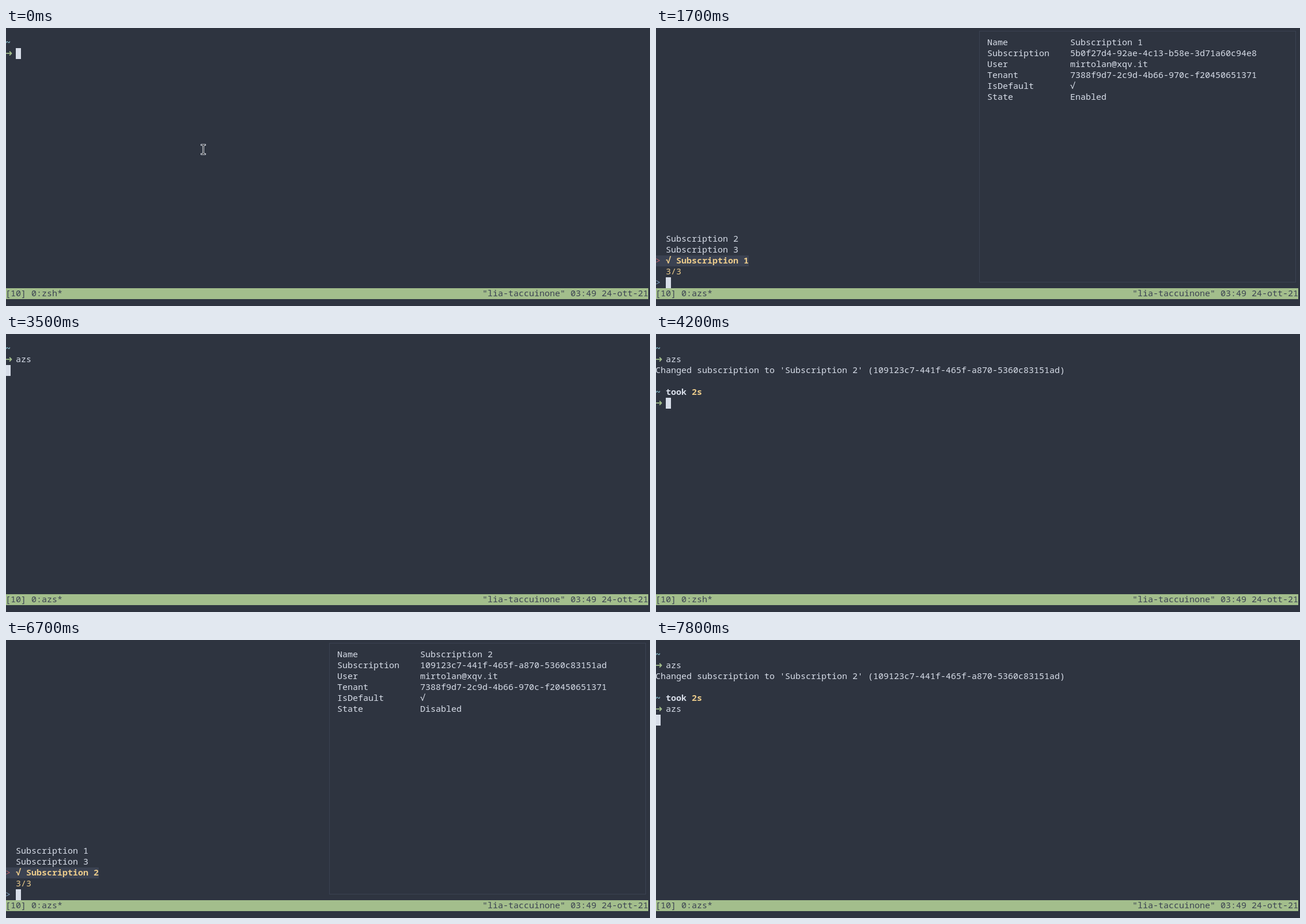
Recreate the animation shown at these times as an HTML page with a canvas. Size 1118 by 484 pixels, loop 8 s.

```html
<!DOCTYPE html>
<html lang="en">
<head>
<meta charset="utf-8">
<title>Terminal session</title>
<style>
  html, body { margin: 0; width: 100%; height: 100%; overflow: hidden; background: #2e3440; }
  canvas { display: block; }
</style>
</head>
<body>
<canvas id="stage" width="1118" height="484"></canvas>
<script>
const ctx = document.getElementById('stage').getContext('2d');
const LOOP = 8000, CELL_W = 9, CELL_H = 19;
const MONO = '15px "Noto Sans Mono", "DejaVu Sans Mono", monospace';
const C = {
  bg: '#2e3440', fg: '#d8dee9', dark: '#3b4252', green: '#a3be8c', cyan: '#88c0d0',
  yellow: '#ebcb8b', red: '#bf616a', blue: '#81a1c1'
};

const HOST = 'lia-taccuinone';
const USER = 'mirtolan@xqv.it';
const TENANT = '7388f9d7-2c9d-4b66-970c-f20450651371';
const SUBS = {
  1: { id: '5b0f27d4-92ae-4c13-b58e-3d71a60c94e8', state: 'Enabled' },
  2: { id: '109123c7-441f-465f-a870-5360c83151ad', state: 'Disabled' },
  3: { id: '75e403c1-b3ce-44b0-a616-fc483fec4f2f', state: 'Enabled' }
};

// The character grid starts slightly outside the stage.
const colX = col => col * CELL_W - 1;
const rowY = row => row * CELL_H - 3;

function rect(x, y, w, h, color) {
  ctx.fillStyle = color;
  ctx.fillRect(x, y, w, h);
}

function text(str, col, row, color = C.fg, bold = false) {
  ctx.font = (bold ? 'bold ' : '') + MONO;
  ctx.fillStyle = color;
  ctx.fillText(str, colX(col), rowY(row) + 14);
}

function cursor(col, row) {
  rect(colX(col), rowY(row), CELL_W, CELL_H, C.fg);
}

function cross(col, row) {
  const x = colX(col) + 2.5, y = rowY(row) + 6.5, size = 7;
  ctx.strokeStyle = C.fg;
  ctx.lineWidth = 2.8;
  ctx.beginPath();
  ctx.moveTo(x, y);
  ctx.lineTo(x + size, y + size);
  ctx.moveTo(x + size, y);
  ctx.lineTo(x, y + size);
  ctx.stroke();
}

function mouse() {
  rect(338, 202, 9, 3, C.fg);
  rect(338, 218, 9, 3, C.fg);
  rect(341, 203, 3, 17, C.fg);
  rect(339, 203, 7, 1, '#000');
  rect(339, 219, 7, 1, '#000');
  rect(342, 203, 1, 17, '#000');
}

function status(name) {
  rect(0, rowY(24), 1115, CELL_H, C.green);
  text(`[10] 0:${name}*`, 0, 24, C.dark);
  const right = `"${HOST}" 03:49 24-ott-21`;
  text(right, 124 - right.length, 24, C.dark);
}

function prompt(row, typed) {
  text('~', 0, row, C.cyan, true);
  ctx.font = 'bold 15px "DejaVu Sans", sans-serif';
  ctx.fillStyle = C.green;
  ctx.fillText('➜', colX(0), rowY(row + 1) + 14);
  text(typed, 2, row + 1);
}

function preview(n, isDefault) {
  ctx.strokeStyle = C.dark;
  ctx.lineWidth = 1;
  ctx.strokeRect(561.5, 5.5, 549, 437);
  const rows = [
    ['Name', `Subscription ${n}`],
    ['Subscription', SUBS[n].id],
    ['User', USER],
    ['Tenant', TENANT],
    ['IsDefault', isDefault ? '√' : ''],
    ['State', SUBS[n].state]
  ];
  rows.forEach(([label, value], i) => {
    text(label, 64, i + 1);
    text(value, 80, i + 1);
  });
  if (!isDefault) cross(80, 5);
}

// The last entry of the list is the default subscription.
function picker(list, selected) {
  list.forEach((n, i) => {
    const row = 19 + i, current = n === selected;
    const label = (i === list.length - 1 ? '√ ' : '') + `Subscription ${n}`;
    if (current) {
      rect(0, rowY(row), colX(label.length + 2), CELL_H, C.dark);
      text('>', 0, row, C.red);
    }
    text(label, 2, row, current ? C.yellow : C.fg, current);
  });
  text('3/3', 2, 22, C.yellow);
  text('>', 0, 23, C.blue);
  cursor(2, 23);
  preview(selected, selected === list[list.length - 1]);
}

function shell(typed, at) {
  prompt(1, typed);
  cursor(...(at || [2 + typed.length, 2]));
}

function result() {
  text(`Changed subscription to 'Subscription 2' (${SUBS[2].id})`, 0, 3);
}

function secondShell(typed, at) {
  prompt(1, 'azs');
  result();
  prompt(5, typed);
  text('took', 2, 5, C.fg, true);
  text('2s', 7, 5, C.yellow, true);
  cursor(...(at || [2 + typed.length, 6]));
}

const FIRST = [2, 3, 1], SECOND = [1, 3, 2];
const SCENES = [
  [0, () => { shell(''); mouse(); }],
  [600, () => shell('')],
  [700, () => shell('a')],
  [900, () => shell('az')],
  [1200, () => shell('azs')],
  [1600, () => shell('azs', [0, 3])],
  [1700, () => picker(FIRST, 1)],
  [2600, () => picker(FIRST, 3)],
  [2900, () => picker(FIRST, 2)],
  [3500, () => shell('azs', [0, 3])],
  [3900, () => { shell('azs', [0, 4]); result(); }],
  [4000, () => secondShell('')],
  [5700, () => secondShell('a')],
  [5900, () => secondShell('az')],
  [6100, () => secondShell('azs')],
  [6300, () => secondShell('azs', [0, 7])],
  [6400, () => picker(SECOND, 2)],
  [7200, () => picker(SECOND, 3)],
  [7800, () => secondShell('azs', [0, 7])]
];

function draw(t) {
  rect(0, 0, 1118, 484, C.bg);
  SCENES.filter(([start]) => start <= t).pop()[1]();
  const running = (t >= 1700 && t < 4200) || t >= 6700;
  status(running ? 'azs' : 'zsh');
}

const begin = performance.now();
function tick() {
  draw((performance.now() - begin) % LOOP);
  requestAnimationFrame(tick);
}
tick();
</script>
</body>
</html>
```
